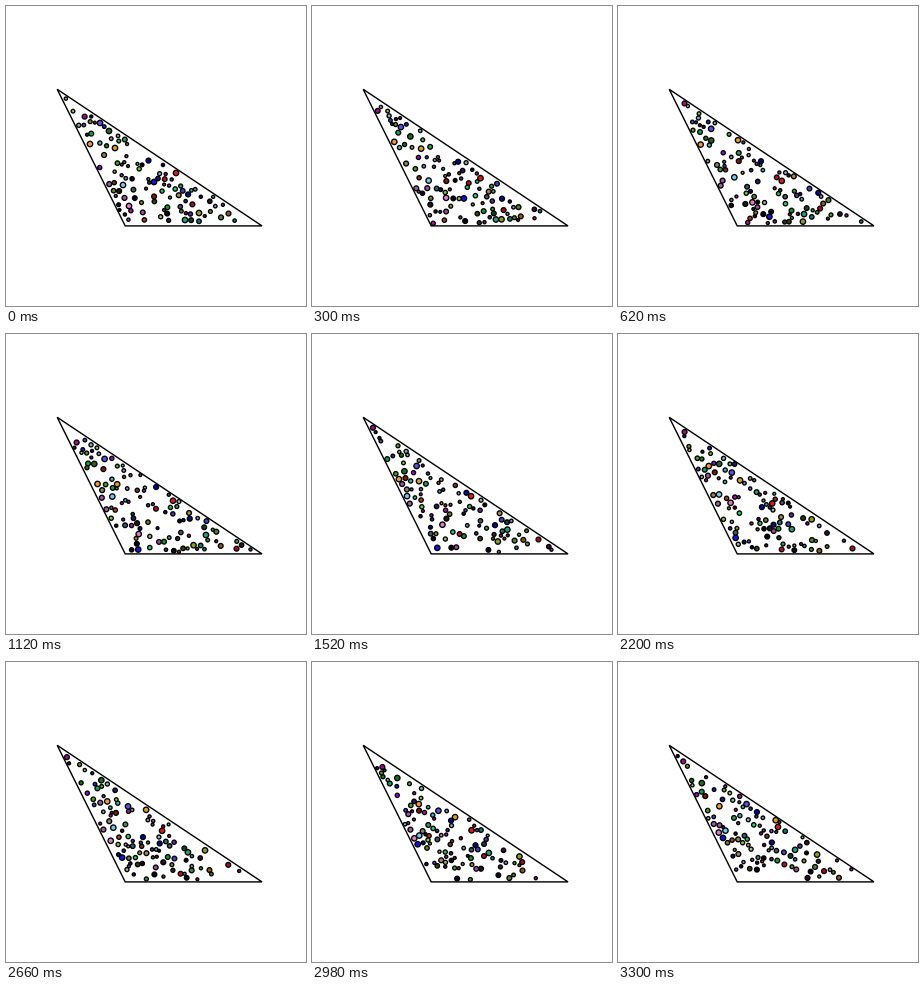
A matplotlib script that plays this animation: 300 px wide and 300 px high, repeating every 3.32 s.

```python
import numpy as np
import matplotlib.pyplot as plt
from matplotlib.animation import FuncAnimation

SIZE, DPI = 300, 100
FRAMES, INTERVAL = 166, 20
PX = 72 / DPI                      # one pixel in points
SUBSTEPS = 2
COUNT = 104

TRIANGLE = np.array([(51.2, 83.3), (256, 219.9), (119.2, 219.9)])

# The largest discs: colour and starting point
LARGE = {
    "#f59a28": (84, 138),
    "#e0a010": (109, 142),
    "#5a50e0": (94, 117),
    "#1414e0": (148, 176),
    "#e01818": (170, 167),
    "#1fa07a": (179, 214),
    "#8aa018": (193, 207),
    "#e07ac8": (123, 200),
    "#1f6a1f": (103, 125),
    "#78c8f0": (117, 179),
}

rng = np.random.default_rng(12)


def inward_normals():
    edges = np.roll(TRIANGLE, -1, axis=0) - TRIANGLE
    normals = np.column_stack((-edges[:, 1], edges[:, 0]))
    normals /= np.linalg.norm(normals, axis=1)[:, None]
    side = ((TRIANGLE.mean(axis=0) - TRIANGLE) * normals).sum(axis=1)
    return normals * np.sign(side)[:, None]


NORMALS = inward_normals()


def start_positions(radii):
    """Fill the triangle without overlaps, largest discs first."""
    placed = list(np.array(list(LARGE.values()), float))
    for i in range(len(placed), len(radii)):
        for _ in range(3000):
            p = rng.uniform(TRIANGLE.min(axis=0), TRIANGLE.max(axis=0))
            if (((p - TRIANGLE) * NORMALS).sum(axis=1) < radii[i] + 0.5).any():
                continue
            gaps = np.linalg.norm(np.array(placed) - p, axis=1)
            if (gaps > radii[:i] + radii[i]).all():
                break
        placed.append(p)
    return np.array(placed)


def collide(pos, vel, radii, mass):
    delta = pos[:, None] - pos[None]
    dist = np.hypot(delta[..., 0], delta[..., 1])
    touching = np.triu(dist < radii[:, None] + radii[None], 1)
    for i, j in np.argwhere(touching):
        gap = pos[i] - pos[j]
        d = max(np.hypot(*gap), 1e-6)
        n = gap / d
        share = mass[j] / (mass[i] + mass[j])
        push = max(radii[i] + radii[j] - d, 0)
        pos[i] += n * push * share
        pos[j] -= n * push * (1 - share)
        approach = (vel[i] - vel[j]) @ n
        if approach < 0:
            vel[i] -= 2 * approach * share * n
            vel[j] += 2 * approach * (1 - share) * n


def bounce_off_walls(pos, vel, radii):
    for corner, n in zip(TRIANGLE, NORMALS):
        depth = radii + 0.5 - (pos - corner) @ n
        hit = depth > 0
        pos[hit] += depth[hit, None] * n
        speed = vel @ n
        back = hit & (speed < 0)
        vel[back] -= 2 * speed[back, None] * n


def simulate(radii):
    pos = start_positions(radii)
    vel = rng.normal(0, 0.7, pos.shape) * (2.2 / radii)[:, None]
    mass = radii ** 2
    track = [pos.copy()]
    for _ in range(FRAMES - 1):
        for _ in range(SUBSTEPS):
            pos += vel / SUBSTEPS
            collide(pos, vel, radii, mass)
            bounce_off_walls(pos, vel, radii)
        track.append(pos.copy())
    return np.array(track)


rest = COUNT - len(LARGE)
small = np.sort(1.4 + 1.1 * rng.random(rest) ** 1.3)[::-1]
radii = np.concatenate((np.full(len(LARGE), 2.7), small))
shades = rng.random((rest, 3)) ** 1.3 * (0.75, 0.85, 0.9)
colors = list(LARGE) + [tuple(c) for c in shades]
track = simulate(radii)

fig = plt.figure(figsize=(SIZE / DPI, SIZE / DPI), dpi=DPI, facecolor="white")
ax = fig.add_axes([0, 0, 1, 1])
ax.set_xlim(0, SIZE)
ax.set_ylim(SIZE, 0)
ax.axis("off")
ax.add_patch(plt.Polygon(TRIANGLE, fill=False, ec="black", lw=1.4 * PX, zorder=1))
discs = ax.scatter(*track[0].T, s=(2 * radii * PX) ** 2, c=colors,
                   edgecolors="black", linewidths=1.35 * PX, zorder=2)


def draw(frame):
    discs.set_offsets(track[frame])
    return (discs,)


anim = FuncAnimation(fig, draw, frames=FRAMES, interval=INTERVAL,
                     repeat=True, repeat_delay=0, blit=False)
plt.show()
```
